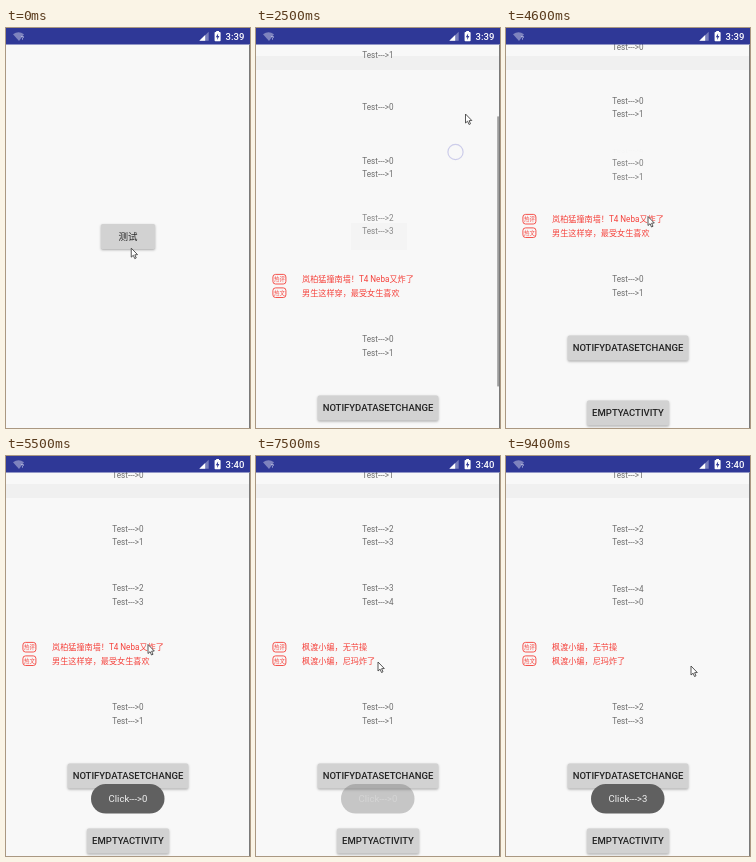
These frames come from a looping animation (244 by 400 pixels, 9600 ms). An HTML page with a canvas:

```html
<!DOCTYPE html>
<html lang="zh">
<head>
<meta charset="utf-8">
<style>
html, body { margin: 0; width: 100%; height: 100%; overflow: hidden; background: #f8f8f8; }
canvas { display: block; width: 244px; height: 400px; }
</style>
</head>
<body>
<canvas id="stage"></canvas>
<script>
const W = 244, H = 400, LOOP = 9600, ROW = 13.5, BAR = 16.5;
const FONT = 'Roboto, "Noto Sans CJK SC", "Noto Sans CJK", sans-serif';
const RED = '#f5423c';
const canvas = document.getElementById('stage');
const dpr = window.devicePixelRatio || 1;
canvas.width = W * dpr;
canvas.height = H * dpr;
const g = canvas.getContext('2d');

const clamp = (v, lo = 0, hi = 1) => Math.max(lo, Math.min(hi, v));
const ease = v => { const p = clamp(v); return p * p * (3 - 2 * p); };

// Pointer stops: arrival time and place.
const STOPS = [
  [300, 122, 213], [700, 118, 206], [1350, 195, 331], [2500, 209.5, 86], [3300, 212, 140],
  [3900, 150, 318], [4600, 142, 188.5], [6300, 158.5, 202], [7500, 122, 206], [8200, 185, 210]
];

const NEWS = [
  ['热评', '岚柏猛撞南墙！T4 Neba又炸了'],
  ['热文', '男生这样穿，最受女生喜欢'],
  ['热评', '枫渡小编，无节操'],
  ['热文', '枫渡小编，尼玛炸了']
];

// y: middle of the first row before scrolling; flip(k): start of the k-th flip
const TICKERS = [
  { y: 74.4, rows: 1 },
  { y: 127.4, rows: 2 },
  { y: 193.4, rows: 1, flip: k => k ? Infinity : 5800 },
  { y: 246.6, rows: 2, flip: k => k ? Infinity : 5800 },
  { y: 306.2, rows: 2, flip: k => 1820 + (620 + 4 * k) * k },
  { y: 365.1, rows: 2, flip: k => k ? Infinity : 6075, news: true },
  { y: 425.2, rows: 2, flip: k => k ? Infinity : 8750 }
];

function text(s, x, y, size, color, { align = 'left', weight = 400 } = {}) {
  g.font = `${weight} ${size}px ${FONT}`;
  g.textAlign = align;
  g.textBaseline = 'alphabetic';
  g.fillStyle = color;
  g.fillText(s, x, y + size * 0.36);
}

function round(x, y, w, h, r) {
  g.beginPath();
  g.roundRect(x, y, w, h, r);
}

function poly(points, fill) {
  g.beginPath();
  points.forEach(([x, y]) => g.lineTo(x, y));
  g.closePath();
  g.fillStyle = fill;
  g.fill();
}

function button(label, cx, cy, w, h = 25) {
  g.save();
  g.shadowColor = 'rgba(0,0,0,.32)';
  g.shadowBlur = 2.5 * dpr;
  g.shadowOffsetY = dpr;
  round(cx - w / 2, cy - h / 2, w, h, 1.5);
  g.fillStyle = '#d2d2d2';
  g.fill();
  g.restore();
  text(label, cx, cy, 9.5, '#222', { align: 'center', weight: 500 });
}

function newsRow([tag, title], y) {
  round(16.9, y - 4.7, 13, 9.6, 2.6);
  g.strokeStyle = RED;
  g.lineWidth = 0.9;
  g.stroke();
  text(tag, 23.4, y + 0.1, 5.4, RED, { align: 'center' });
  text(title, 46, y, 8.13, RED);
}

function page(v, n, y, alpha) {
  g.globalAlpha = alpha;
  for (let i = 0; i < v.rows; i++) {
    const row = n * v.rows + i;
    if (v.news) newsRow(NEWS[row % NEWS.length], y + i * ROW);
    else text('Test--->' + row % 5, 106.3, y + i * ROW, 8.13, '#6e6e6e');
  }
}

// The old page slides up and fades out while the next slides in from below.
function ticker(v, t, scroll) {
  const y = v.y - scroll, h = ROW * v.rows;
  let n = 0;
  while (v.flip && v.flip(n) <= t - 300) n++;
  const p = v.flip ? ease((t - v.flip(n)) / 300) : 0;
  g.save();
  g.beginPath();
  g.rect(0, y - ROW / 2 - 4, W, h + 4);
  g.clip();
  page(v, n, y - p * h, (1 - p) ** 2);
  if (p > 0) page(v, n + 1, y + (1 - p) * h, p);
  g.restore();
}

function toast(n, t, from, to) {
  const alpha = Math.min(clamp((t - from) / 300), clamp((to - t) / 300));
  if (!alpha) return;
  g.save();
  g.globalAlpha = alpha;
  round(85, 328, 73.5, 29.5, 14.75);
  g.fillStyle = '#606060';
  g.fill();
  text('Click--->' + n, 122, 342.8, 9.5, '#f2f2f2', { align: 'center' });
  g.restore();
}

function statusBar(t) {
  g.fillStyle = '#2f3897';
  g.fillRect(0, 0, W, BAR);
  // wireless
  g.beginPath();
  g.moveTo(13, 13);
  g.lineTo(7, 6.2);
  g.quadraticCurveTo(12.5, 2.4, 18, 6.2);
  g.closePath();
  g.fillStyle = 'rgba(255,255,255,.38)';
  g.fill();
  text('?', 16.5, 9.8, 6, '#d5d8f0', { align: 'center', weight: 500 });
  // signal
  poly([[193.3, 12.7], [202.7, 12.7], [202.7, 3.7]], 'rgba(255,255,255,.35)');
  poly([[193.3, 12.7], [199.2, 12.7], [199.2, 7]], '#fff');
  // battery
  g.fillStyle = '#fff';
  g.fillRect(210.2, 3, 2.8, 2);
  round(208.6, 4, 6, 9.3, 0.8);
  g.fill();
  poly([[212.2, 5.2], [209.8, 9.2], [211.3, 9.2], [211, 12], [213.4, 8], [211.9, 8]], '#2f3897');
  text(t < 5000 ? '3:39' : '3:40', 238.3, 8.7, 9.5, '#fff', { align: 'right', weight: 500 });
}

function listScreen(t) {
  // a steady drag, then a shorter eased one
  const scroll = 0.1425 * (Math.min(t, 2500) - 1700) + 60 * ease((t - 2600) / 600);
  if (t >= 1700) {
    g.fillStyle = '#f0f0f0';
    g.fillRect(0, 28, W, 14);
  }
  // the first screen's button fades away
  g.save();
  g.globalAlpha = 0.3 * clamp(1 - (t - 1500) / 1700);
  if (t < 2300) button('测试', 122, 208.5, 54);
  else {
    g.fillStyle = '#d2d2d2';
    g.fillRect(95, 195, 56, 27);
  }
  g.restore();

  TICKERS.forEach(v => ticker(v, t, scroll));
  button('NOTIFYDATASETCHANGE', 122, 494 - scroll, 120.5);
  button('EMPTYACTIVITY', 122, 559 - scroll, 82);

  g.fillStyle = '#5361b3';
  g.fillRect(0, BAR, W, Math.max(0, 28 - scroll - BAR));
  g.fillStyle = `rgba(120,120,120,${0.7 * clamp((3500 - t) / 300)})`;
  g.fillRect(241.2, 28 + scroll * 0.53, 2.8, 270);
  if (t >= 2300 && t < 2700) {
    g.beginPath();
    g.arc(199.5, 124, 7.6, 0, Math.PI * 2);
    g.strokeStyle = '#cdcdea';
    g.lineWidth = 1.2;
    g.stroke();
  }
  toast(0, t, 5000, 7600);
  toast(3, t, 7700, LOOP + 300);
}

function pointer(t) {
  let x = 127, y = 224;
  for (const [at, sx, sy] of STOPS) {
    const p = ease((t - at + 500) / 500);
    x += (sx - x) * p;
    y += (sy - y) * p;
  }
  const shape = [[0, 0], [0, 9], [2.1, 7.2], [3.5, 10.5], [5, 9.8], [3.6, 6.7], [6.3, 6.5]];
  g.save();
  g.translate(x, y);
  poly(shape, '#fff');
  g.strokeStyle = '#444';
  g.lineWidth = 0.9;
  g.lineJoin = 'round';
  g.stroke();
  g.restore();
}

function draw(now) {
  const t = Math.floor((now % LOOP) / 100) * 100;
  g.setTransform(dpr, 0, 0, dpr, 0, 0);
  g.fillStyle = '#f8f8f8';
  g.fillRect(0, 0, W, H);
  if (t < 1500) button('测试', 122, 208.5, 54);
  else listScreen(t);
  statusBar(t);
  g.fillStyle = '#7a7a7a';
  g.fillRect(243, BAR, 1, H);
  pointer(t);
}

let begin = null;
function tick(now) {
  if (begin === null) begin = now;
  draw(Math.max(0, now - begin));
  requestAnimationFrame(tick);
}
draw(0);
requestAnimationFrame(tick);
</script>
</body>
</html>
```
